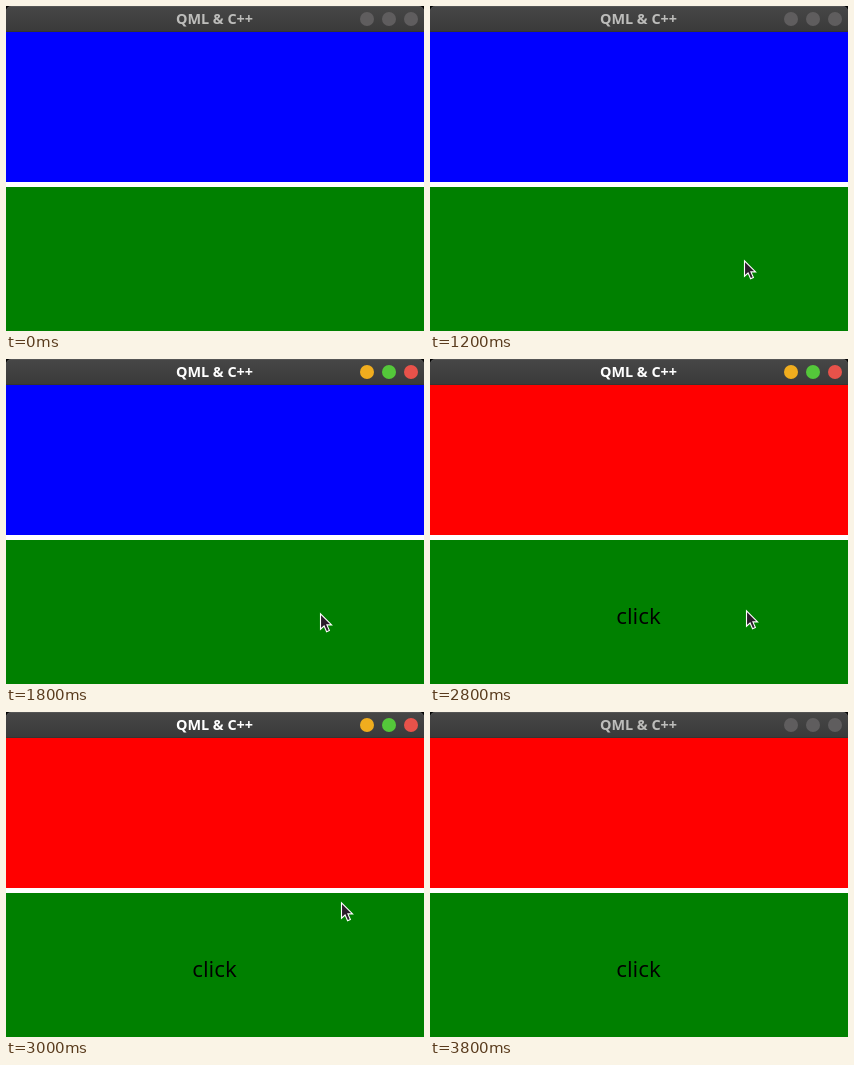
Recreate the animation shown at these times as an HTML page. Size 418 by 325 pixels, loop 4 s.

```html
<!DOCTYPE html>
<html lang="en">
<head>
<meta charset="utf-8">
<title>QML &amp; C++</title>
<style>
  html, body { margin: 0; width: 100%; height: 100%; overflow: hidden; background: #000; }
  svg { display: block; width: 100%; height: 100%; }
  text { font-family: "Open Sans", "Noto Sans", sans-serif; text-anchor: middle; }
</style>
</head>
<body>
<svg viewBox="0 0 418 325">
  <defs>
    <linearGradient id="bar" x2="0" y2="1">
      <stop stop-color="#464646"/>
      <stop offset="1" stop-color="#3a3a3a"/>
    </linearGradient>
  </defs>
  <rect width="418" height="40" rx="5" fill="#555"/>
  <path d="M0 26V5Q1 1 5 1H413Q417 1 418 5V26Z" fill="url(#bar)"/>
  <rect y="25" width="418" height="1" fill="#343432"/>
  <text id="title" x="208.5" y="18" font-size="14.4" font-weight="700">QML &amp; C++</text>
  <g id="buttons">
    <circle cx="361" cy="13" r="7"/>
    <circle cx="383" cy="13" r="7"/>
    <circle cx="405" cy="13" r="7"/>
  </g>
  <rect id="top" y="26" width="418" height="150"/>
  <rect y="176" width="418" height="5" fill="#fff"/>
  <rect y="181" width="418" height="144" fill="#008000"/>
  <text id="label" x="208.5" y="264.5" font-size="22.5">click</text>
  <path id="cursor" d="M.5 .8V16.2L4.1 13L6.6 18.7L9.4 17.5L6.9 11.9H11.6Z"
        fill="#2b1d2b" stroke="#fff" stroke-width="1.1"/>
</svg>
<script>
  const $ = id => document.getElementById(id);
  const LOOP = 4000;
  const lights = ["#f0ad1e", "#54c73a", "#e8524a"];

  // Pointer positions, each held from its start time; no position means hidden.
  const pointer = [
    [0], [800, 323, 310], [1000, 319, 285], [1100, 315, 261], [1200, 314, 254],
    [2800, 316, 251], [2900, 322, 235], [3000, 335, 190], [3100, 353, 108], [3200]
  ];

  function draw() {
    const t = performance.now() % LOOP;
    const active = t >= 1800 && t < 3800;
    const clicked = t >= 1900;
    const [, x, y] = pointer.findLast(([start]) => t >= start);

    $("title").setAttribute("fill", active ? "#fff" : "#bdbdbb");
    [...$("buttons").children].forEach((button, i) =>
      button.setAttribute("fill", active ? lights[i] : "#5f5d5e"));
    $("top").setAttribute("fill", clicked ? "#f00" : "#00f");
    $("label").style.display = clicked ? "" : "none";
    $("cursor").style.display = x ? "" : "none";
    if (x) $("cursor").setAttribute("transform", `translate(${x} ${y})`);
    requestAnimationFrame(draw);
  }
  draw();
</script>
</body>
</html>
```
